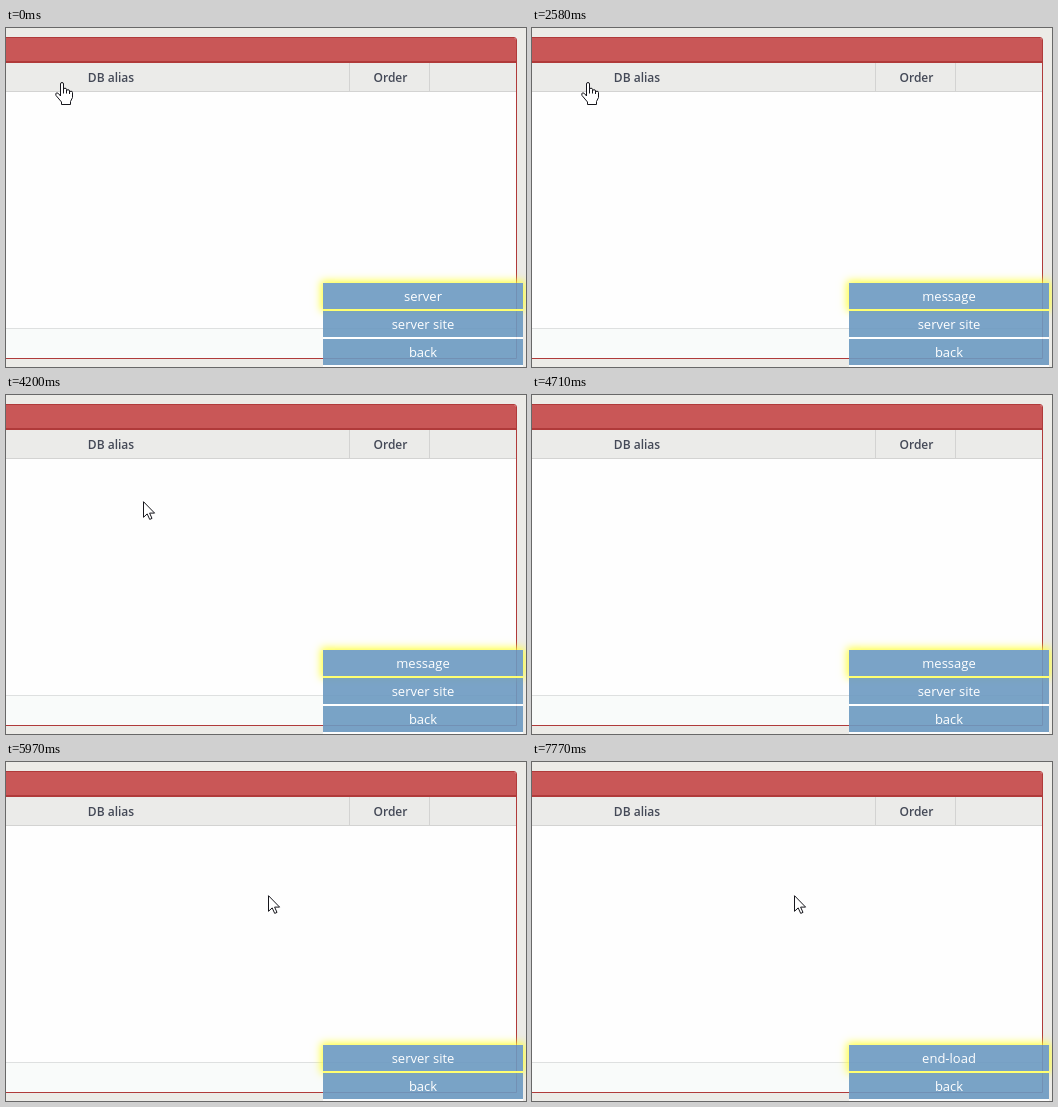
Animation, 520 px wide and 339 px high, one loop 8 s. Source, as an HTML page:

```html
<!DOCTYPE html>
<html lang="en">
<head>
<meta charset="utf-8">
<title>Table with action menu</title>
<style>
  html, body { margin: 0; width: 100%; height: 100%; overflow: hidden; background: #ecebe7; }
  body { position: relative; font-family: "Open Sans", sans-serif; }
  body > *, .panel > * { position: absolute; box-sizing: border-box; }
  .panel { left: -10px; top: 9px; width: 521px; height: 322px; overflow: hidden;
    background: #fefefe; border: 1px solid #b03a3a; border-radius: 3px 3px 0 0; }
  .panel > * { left: 0; width: 100%; }
  .title { top: 0; height: 25px; background: #c95757; border-bottom: 2px solid #b03a3a; }
  .head { top: 25px; height: 29px; background: #ebebe9; border-bottom: 1px solid #d3d3d2; }
  .foot { top: 290px; height: 30px; background: #f9fbfa; border-top: 1px solid #dee0e0; }
  .label { top: 36px; height: 27px; font: 600 12px/27px "Open Sans", sans-serif;
    color: #444957; text-align: center; }
  .alias { left: 0; width: 210px; }
  .order { left: 343px; width: 81px; height: 28px; top: 35px; line-height: 29px;
    padding-left: 2px; border: solid #d3d3d2; border-width: 0 1px; }
  .menu { left: 317px; bottom: 0; width: 200px; }
  .item { position: relative; height: 26px; margin-bottom: 2px; font-size: 13px;
    line-height: 26px; text-align: center; color: #fff; background: rgba(108, 154, 193, .9); }
  .item::after { content: ""; position: absolute; left: 0; top: 26px; width: 100%; height: 2px;
    background: rgba(255, 255, 255, .92); }
  .item:first-child { box-shadow: 0 0 8px 2px #ffff38; }
  .item:first-child::after { background: #ffff70; }
  svg { left: 0; top: 0; width: 520px; height: 339px; }
  path { fill: #fff; stroke: #16161c; stroke-width: 1; stroke-linejoin: round; }
</style>
</head>
<body>
<div class="panel">
  <div class="title"></div>
  <div class="head"></div>
  <div class="foot"></div>
</div>
<div class="label alias">DB alias</div>
<div class="label order">Order</div>
<div class="menu"></div>
<svg viewBox="0 0 520 339">
  <g id="hand">
    <path d="M5.5 14V2a1.5 1.5 0 0 1 3 0V8.5V7.5a1.5 1.3 0 0 1 3 0V9a1.5 1.3 0 0 1 3 0V10.5a1.5 1.3 0 0 1 3 0V15.5L15.5 19.5V22.5H6.5V20L1 13.5Q0 11 2 10.8Q3.5 11 5.5 14ZM8.5 8v3.5M11.5 9v2.5M14.5 10v2"/>
  </g>
  <g id="arrow">
    <path d="M.5 .7V16.3L4.2 12.9L6.7 18.4L9 17.4L6.6 12.1H11.6Z"/>
  </g>
</svg>
<script>
const LOOP = 8000, TICK = 30;

const menus = [
  [0, "server", "server site", "back"],
  [1320, "end-load", "message", "server site", "back"],
  [2580, "message", "server site", "back"],
  [5160, "server site", "back"],
  [6480, "fill", "end-load", "back"],
  [7770, "end-load", "back"]
];

// Each move: start, end, shape, from, to, ease-out power
const moves = [
  [0, 0, "hand", [49, 54], [49, 54], 1],
  [3630, 3750, "hand", [49, 54], [45, 62], 1],
  [3930, 4230, "arrow", [59, 65], [140, 107], 1.5],
  [4590, 4680, "arrow", [140, 107], [283, 8], 1],
  [4710, 4710, "none", [0, 0], [0, 0], 1],
  [5730, 5970, "arrow", [357, -3], [262, 133], 1.5]
];

const menu = document.querySelector(".menu");
const cursors = ["hand", "arrow"].map(id => document.getElementById(id));
const latest = (table, t) => table.filter(row => row[0] <= t).pop();
let shown;

function drawMenu(t) {
  const row = latest(menus, t);
  if (row === shown) return;
  shown = row;
  menu.replaceChildren(...row.slice(1).map(text => {
    const item = document.createElement("div");
    item.className = "item";
    item.textContent = text;
    return item;
  }));
}

function drawCursor(t) {
  const [start, end, shape, from, to, power] = latest(moves, t);
  const now = Math.floor(t / TICK) * TICK;
  const p = end > start ? Math.min(1, Math.max(0, (now - start) / (end - start))) : 1;
  const k = 1 - (1 - p) ** power;
  const [x, y] = from.map((a, i) => Math.round(a + (to[i] - a) * k));
  for (const c of cursors) {
    c.style.display = c.id === shape ? "" : "none";
    c.setAttribute("transform", `translate(${x} ${y})`);
  }
}

function frame() {
  const t = performance.now() % LOOP;
  drawMenu(t);
  drawCursor(t);
  requestAnimationFrame(frame);
}
frame();
</script>
</body>
</html>
```
